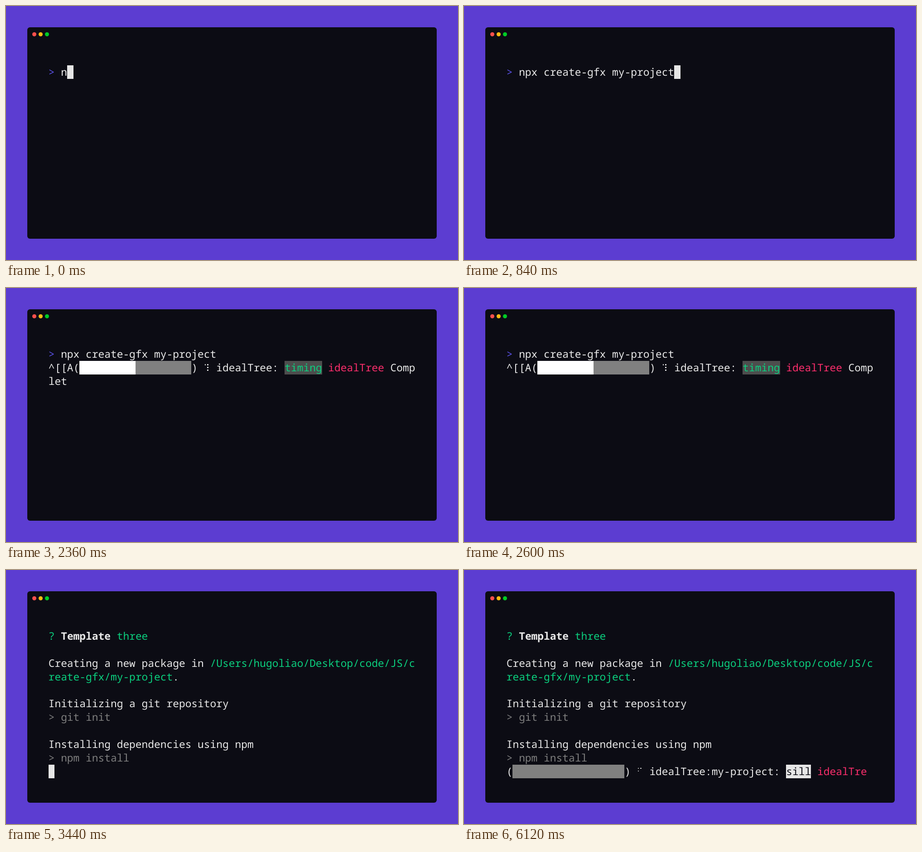
Recreate the animation shown at these times as an HTML page. Size 998 by 561 pixels, loop 6.32 s.

```html
<!DOCTYPE html>
<html lang="en">
<head>
<meta charset="utf-8">
<title>Terminal</title>
<style>
  html, body { margin: 0; width: 100%; height: 100%; overflow: hidden; background: #5c3dd1; }
  #win { position: absolute; left: 47px; top: 47px; width: 904px; height: 467px; border-radius: 6px; background: #0c0c14; }
  #win i { position: absolute; top: 10.5px; width: 9.4px; height: 9.4px; border-radius: 50%; }
  pre {
    position: absolute; left: 93.7px; top: 130.9px; margin: 0; color: #eaeaea;
    font: 500 22.888px/29.88px "Noto Sans Mono", "DejaVu Sans Mono", monospace;
    font-variant-ligatures: none; text-rendering: geometricPrecision;
  }
  pre div { height: 29.88px; }
  pre span { display: inline-block; height: 29.88px; vertical-align: top; }
  .prompt { color: #5b52e8; }
  .green { color: #0bd07f; }
  .pink { color: #fb2e6c; }
  .gray { color: #7e7e7e; }
  .bold { font-weight: 700; }
  .cursor { background: #e6e6e6; }
  .done { background: #fff; }
  .todo { background: #808080; }
  .timing { background: #4d4d4d; color: #0bd07f; }
  .sill { background: #e6e6e6; color: #0c0c14; }
  .cell { position: relative; width: 1ch; }
  .cell b { position: absolute; width: 2.6px; height: 2.6px; border-radius: 35%; background: #eaeaea; }
</style>
</head>
<body>
<div id="win">
  <i style="left:10.6px;background:#ff504d"></i>
  <i style="left:24.6px;background:#febb12"></i>
  <i style="left:38.6px;background:#00cc25"></i>
</div>
<pre id="term"></pre>
<script>
const LOOP = 6320;
const term = document.getElementById('term');
const s = (cls, text) => `<span class="${cls}">${text}</span>`;
const cursor = s('cursor', ' ');
const command = 'npx create-gfx my-project';
const shell = text => s('prompt', '&gt;') + ' ' + text;

// Braille spinner: low three bits are the left column, next three the right one
function spinner(ch) {
  const bits = ch.charCodeAt(0) - 0x2800;
  let dots = '';
  for (let i = 0; i < 6; i++) {
    if (bits >> i & 1) dots += `<b style="left:${1.7 + (i > 2) * 5.7}px;top:${7.2 + i % 3 * 6}px"></b>`;
  }
  return s('cell', ' ' + dots);
}

const bar = (done, ch) =>
  `(${s('done', ' '.repeat(done))}${s('todo', ' '.repeat(18 - done))}) ${spinner(ch)} idealTree`;
const tree = ch => bar(9, ch) + `: ${s('timing', 'timing')} ${s('pink', 'idealTree')} Comp`;
const install = ch => bar(0, ch) + `:my-project: ${s('sill', 'sill')} ${s('pink', 'idealTre')}`;

const started = [shell(command), '^[[A' + tree('⠹')];

function menu(selected, hint) {
  const names = ['theatre', 'three', 'babylon', 'minimal', 'motion-canvas', 'orillusion', 'p5'];
  return [
    ...started,
    s('green bold', '?') + ' ' + s('bold', 'Template'),
    ...names.map(n => n === selected ? s('green cell', '❯') + ' ' + s('green', n) : '  ' + n),
    hint ? s('gray', '(Move up and down to reveal more choices)') : ''
  ];
}

const created = [
  s('green', '?') + ' ' + s('bold', 'Template') + ' ' + s('green', 'three'),
  '',
  'Creating a new package in ' + s('green', '/Users/hugoliao/Desktop/code/JS/c'),
  s('green', 'reate-gfx/my-project') + '.',
  '',
  'Initializing a git repository',
  s('gray', '&gt; git init')
];
const installing = last => [
  ...created, '', 'Installing dependencies using npm', s('gray', '&gt; npm install'), last
];

// [start in ms, lines]
const scenes = [
  [1360, [shell(command), cursor]],
  [1880, [shell(command), bar(0, '⠙') + ':']],
  [1920, [shell(command), tree('⠙') + 'let']],
  [2360, [...started, 'let']],
  [2440, [...started, tree('⠸') + 'let']],
  [2600, started],
  [2640, [...started, cursor]],
  [2840, menu('theatre', false)],
  [2880, menu('three', true)],
  [3400, [...started, ...created, cursor]],
  [3440, installing(cursor)],
  [3640, installing(bar(0, '⠋'))],
  [3680, installing(install('⠋'))],
  [3720, installing(install('⠙'))],
  [3920, installing(install('⠸'))],
  [4560, installing(install('⠴'))],
  [5560, installing(install('⠇'))],
  [6120, installing(install('⠋'))]
];

function screen(t) {
  if (t < scenes[0][0]) {
    const step = Math.min(21, Math.floor(t / 40));
    return [shell(command.slice(0, 1 + Math.floor(step * 24 / 21)) + cursor)];
  }
  return scenes.findLast(([start]) => t >= start)[1];
}

let shown = '';
function draw() {
  const html = screen(performance.now() % LOOP).map(line => `<div>${line}</div>`).join('');
  if (html !== shown) term.innerHTML = shown = html;
  requestAnimationFrame(draw);
}
draw();
</script>
</body>
</html>
```
